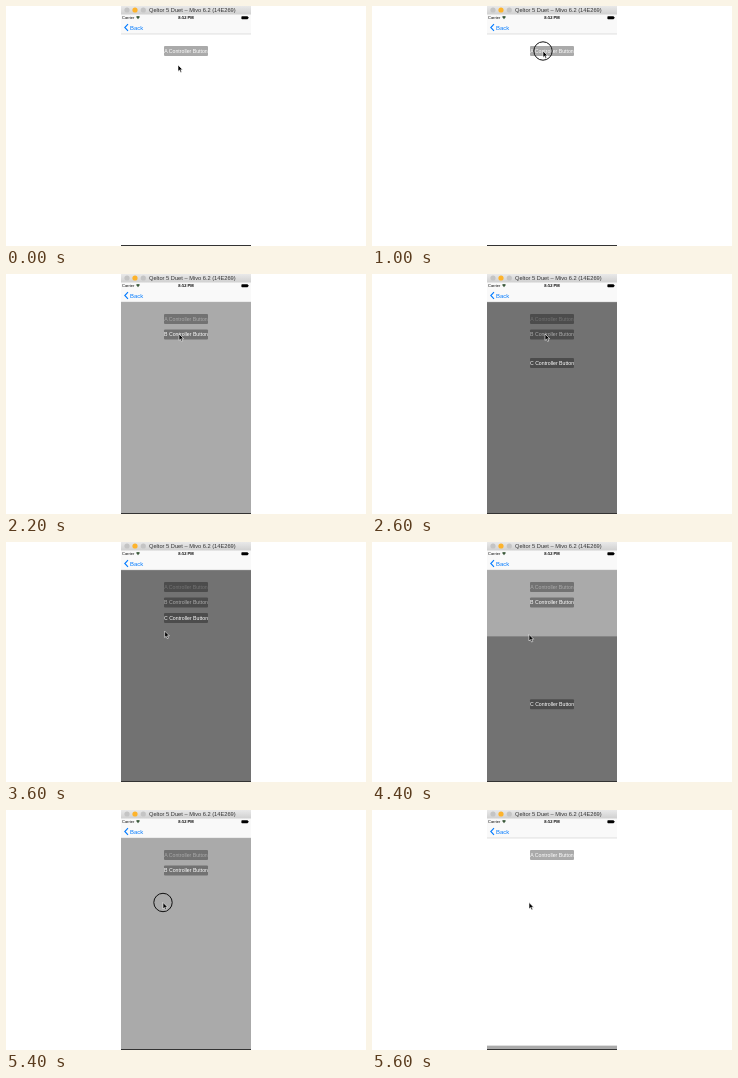
These frames come from a looping animation (360x240 px, 5800 ms). An HTML page:

```html
<!DOCTYPE html>
<html lang="en">
<head>
<meta charset="utf-8">
<title>Stacked sheets</title>
<style>
  html, body { margin: 0; width: 100%; height: 100%; overflow: hidden; background: #fff; }
  svg { display: block; width: 360px; height: 240px; }
  text { font-family: "Liberation Sans", Arial, sans-serif; }
  .label { font-size: 5.2px; fill: #fff; text-anchor: middle; }
  .shade { fill: #000; fill-opacity: .333; }
</style>
</head>
<body>
<svg viewBox="0 0 360 240">
  <defs>
    <linearGradient id="chrome" x2="0" y2="1">
      <stop offset="0" stop-color="#e9e9e9"/>
      <stop offset="1" stop-color="#d0d0d0"/>
    </linearGradient>
    <clipPath id="phone"><rect x="115" width="130" height="240"/></clipPath>
  </defs>
  <g clip-path="url(#phone)">
    <g id="pages"></g>

    <rect x="115" y="8" width="130" height="20" fill="#f9f9f9"/>
    <rect x="115" y="27.8" width="130" height=".4" fill="#b5b5b5"/>
    <text x="116" y="13.2" font-size="4">Carrier</text>
    <path d="M130 10.7Q132 9.3 134 10.7L132 13.2Z" fill="#3c5a3c"/>
    <text x="180" y="13.3" font-size="4.1" font-weight="bold" text-anchor="middle">8:52 PM</text>
    <rect x="235.4" y="10.2" width="6.6" height="3" rx=".7"/>
    <rect x="242.2" y="11.1" width=".6" height="1.2"/>
    <path d="M122 18.2L118.8 21.5L122 24.8" fill="none" stroke="#007aff" stroke-width="1.1"/>
    <text x="124" y="23.6" font-size="5.9" fill="#007aff">Back</text>

    <rect x="115" width="130" height="8.5" fill="url(#chrome)"/>
    <circle cx="121" cy="4" r="2.6" fill="#c4c4c4"/>
    <circle cx="129" cy="4" r="2.6" fill="#fdb32b"/>
    <circle cx="137.3" cy="4" r="2.6" fill="#c4c4c4"/>
    <text x="143" y="6.2" font-size="5.7" fill="#333">Qeltor 5 Duet – Mivo 6.2 (14E269)</text>
    <rect x="115" y="239" width="130" height="1" fill="#333"/>
  </g>
  <g id="cursor">
    <circle id="ring" r="9.2" fill="none" stroke="#111"/>
    <path d="M0 0V6.4L1.5 5.1L2.6 7.5L3.8 7L2.7 4.7H4.7Z" stroke="#fff" stroke-width=".6"/>
  </g>
</svg>
<script>
const LOOP = 5800, STEP = 200, TRAVEL = 231;
const $ = id => document.getElementById(id);

const button = (name, y) =>
  `<rect class="shade" x="158" y="${y - 5}" width="44" height="10" rx="1"/>
   <text class="label" x="180" y="${y + 1.8}">${name} Controller Button</text>`;
const sheet = (name, y) =>
  `<g id="${name}"><rect class="shade" x="115" y="8" width="130" height="232"/>${button(name, y)}</g>`;
$('pages').innerHTML = button('A', 45) + sheet('B', 60.5) + sheet('C', 76);

// Start times of each sheet's rise and fall
const sheets = { B: [1051, 5400], C: [2389, 4358] };
const taps = Object.values(sheets).flat();

// Cursor stops: time, x, y
const stops = [[0, 172, 59], [200, 172, 59], [800, 171, 45], [1400, 171, 45],
  [2000, 173, 60], [2800, 173, 60], [3800, 157, 92.5], [LOOP, 157, 92.5]];

// Critically damped settling from 0 to 1
function settle(ms, rate) {
  const x = Math.max(0, ms) * rate;
  return 1 - (1 + x) * Math.exp(-x);
}

function cursorAt(t) {
  const i = stops.findIndex(s => s[0] > t);
  const [t0, x0, y0] = stops[i - 1], [t1, x1, y1] = stops[i];
  const p = (t - t0) / (t1 - t0), e = p * p * (3 - 2 * p);
  return [x0 + (x1 - x0) * e, y0 + (y1 - y0) * e];
}

function draw(t) {
  for (const [name, [rise, fall]] of Object.entries(sheets)) {
    const hidden = t < fall ? 1 - settle(t - rise, .0218) : settle(t - fall, .031);
    $(name).setAttribute('transform', `translate(0 ${hidden * TRAVEL})`);
    $(name).style.display = t < rise || t > fall + 400 ? 'none' : '';
  }
  $('cursor').setAttribute('transform', `translate(${cursorAt(t)})`);
  $('ring').style.display = taps.some(s => t > s - 150 && t < s + 15) ? '' : 'none';
}

const start = performance.now();
function tick() {
  const t = (performance.now() - start) % LOOP;
  draw(Math.floor(t / STEP) * STEP);
  requestAnimationFrame(tick);
}
tick();
</script>
</body>
</html>
```
